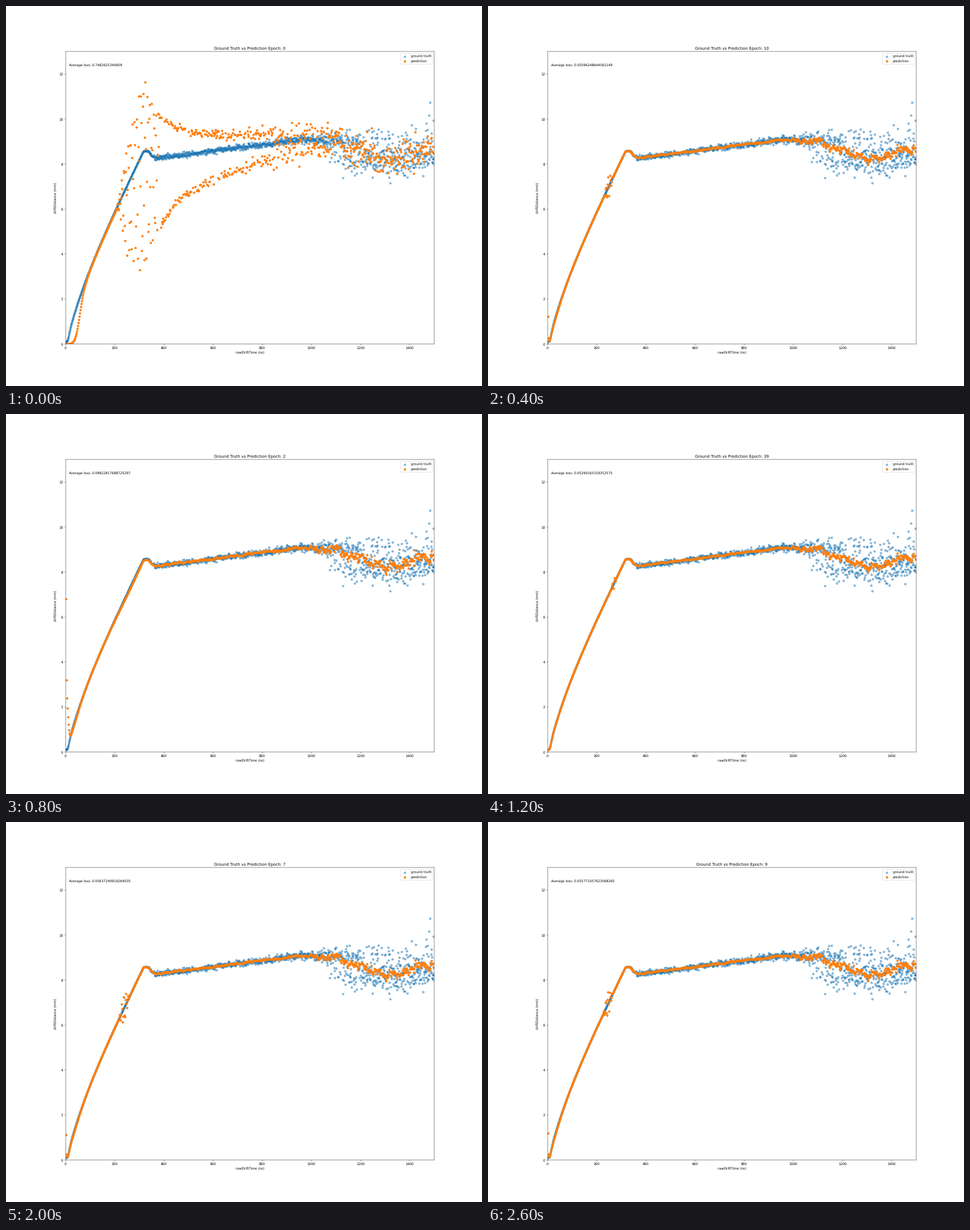
Write a matplotlib script that moves like this. It is 837x669 px and loops after 2800 ms.

```python
import numpy as np
import matplotlib.pyplot as plt
from matplotlib.animation import FuncAnimation

plt.rcParams["text.hinting"] = "none"
plt.rcParams["font.family"] = "DejaVu Sans"

DPI = 41.85
WIDTH, HEIGHT = 837, 669
INTERVAL = 200
rng = np.random.default_rng(7)

# Runs in the order of their names, so 10 comes before 2
LOSSES = {
    0: "0.7482625340609", 1: "0.13641728450184172",
    10: "0.05596248644562149", 19: "0.05417360291844135",
    2: "0.09822817688725297", 3: "0.06981530427616041",
    39: "0.05290165318352575", 4: "0.06107428513960724",
    5: "0.057322082119021546", 6: "0.05683917420508163",
    7: "0.05637240918264035", 75: "0.05253838632690291",
    8: "0.05602716384927518", 9: "0.055771057623568265",
}
STRAYS = [(1483, 10.73), (1479, 10.16), (1497, 9.93), (1321, 7.15), (1129, 7.38)]


def bell(x, centre, width):
    return np.exp(-(((x - centre) / width) ** 2))


def step(x, centre, width):
    """Smooth rise from 0 to 1."""
    return .5 + .5 * np.tanh((x - centre) / (2 * width))


def drift(x):
    """Steep rise to a small peak, then a slowly climbing plateau."""
    u = np.maximum(x - 2.5, 0)
    rise = .0224 * u + 1.53 * (1 - np.exp(-u / 73))
    rise = np.hypot(.11, rise * (1 - bell(x, 0, 12)))
    peak = .36 * bell(np.maximum(x, 331), 331, 20)
    plateau = np.minimum(8.3 + .00137 * (x - 390), 9.08) + peak
    return np.minimum(rise, plateau)


def make_truth():
    x = np.arange(0, 1501, 1.0)
    noise = rng.standard_normal(x.size)
    sd = .008 + .055 * step(x, 350, 8) + .04 * step(x, 900, 60)
    y = drift(x) + sd * noise
    # Late hits fall into an upper and a lower cloud
    low = 8.1 + .5 * np.exp(-np.abs(x - 1040) / 60) + .25 * step(x, 1420, 25)
    low += .3 * noise
    high = 9.07 + (.14 + .2 * step(x, 1180, 25)) * noise
    late = np.where(rng.random(x.size) < .77 * step(x, 1145, 38), low, high)
    y = np.where(x > 1040, np.clip(late, 7.4, 9.8), y)
    for px, py in STRAYS:
        y[px] = py
    return x, y


truth_x, truth_y = make_truth()

x = np.arange(3, 1501, 2.0)
k = np.arange(x.size)
trend = drift(x) - .45 * step(x, 1145, 12) - .4 * bell(x, 1325, 80)
grain = rng.standard_normal(x.size)
drifting = np.convolve(rng.standard_normal(x.size), np.ones(6) / 6 ** .5, "same")
texture = (.8 * drifting + .6 * grain) * (
    .025 * step(x, 360, 8) + .03 * step(x, 980, 20) + .07 * step(x, 1060, 12))
swing = np.cos(2 * np.pi * k / 4.35)


def untrained():
    """Late start, then a split into two branches that close again."""
    early = .99 * trend * step(x, 53, 9)
    away = np.abs(x - 315)
    gap = 1.75 * np.exp(-away / 65) + 1.4 * np.exp(-away / 430)
    gap *= step(x, 230, 7)
    side = np.where(x < 380, swing, np.where(rng.random(x.size) < .58, 1, -1))
    sd = .08 * step(x, 240, 10) + .05 * step(x, 550, 50) + .17 * step(x, 830, 40)
    split = trend + gap * np.where(side > 0, side, 1.75 * side) + sd * grain
    return np.where(x < 205, early, split)


def trained(epoch):
    """Fit near the trend; a stray start and an oscillating patch shrink."""
    settled = step(epoch, 3.5, .3)
    fresh = 3.0 ** -max(epoch - 2, 0)
    y = trend + (.8 + .6 * np.exp(-epoch / 5)) * texture

    y -= .12 * np.exp(-epoch / 20) * bell(x, 35, 28)
    y -= .09 * (1 - settled) * bell(x, 265, 70)

    spike = (.6 + .06 * epoch) * np.exp(-(epoch / 20) ** 4) + 3.4 * fresh
    y += spike * .15 ** k + 2.6 * fresh * bell(k, 0, 5)

    size = settled * (.22 + 1.4 * np.exp(-epoch / 6))
    centre = 270 - 75 * np.exp(-epoch / 8)
    y += size * bell(x, centre, 7 + 13 * np.exp(-epoch / 10)) * swing
    return y


epochs = list(LOSSES)
fits = [trained(e) if e else untrained() for e in epochs]

fig, ax = plt.subplots(
    figsize=((WIDTH + .001) / DPI, (HEIGHT + .001) / DPI), dpi=DPI)


def scatter(x, y, **style):
    # One size per point keeps the markers at subpixel positions
    return ax.scatter(x, y, s=np.full(x.size, 36.0), **style)


scatter(truth_x, truth_y, color="C0", alpha=.5, label="ground truth")
dots = scatter(x, fits[0], color="C1", label="prediction")
ax.set_xlim(0, 1500)
ax.set_ylim(0, 13)
ax.set_xlabel("rawDriftTime (ns)")
ax.set_ylabel("driftDistance (mm)")
ax.legend(loc="upper right")
title = ax.set_title("")
note = ax.text(.01, .95, "", transform=ax.transAxes)


def draw(i):
    epoch = epochs[i]
    dots.set_offsets(np.column_stack([x, fits[i]]))
    title.set_text(f"Ground Truth vs Prediction Epoch: {epoch}")
    note.set_text(f"Average loss: {LOSSES[epoch]}")
    return dots, title, note


anim = FuncAnimation(fig, draw, frames=len(epochs), interval=INTERVAL,
                     repeat=True, repeat_delay=0)
plt.show()
```
